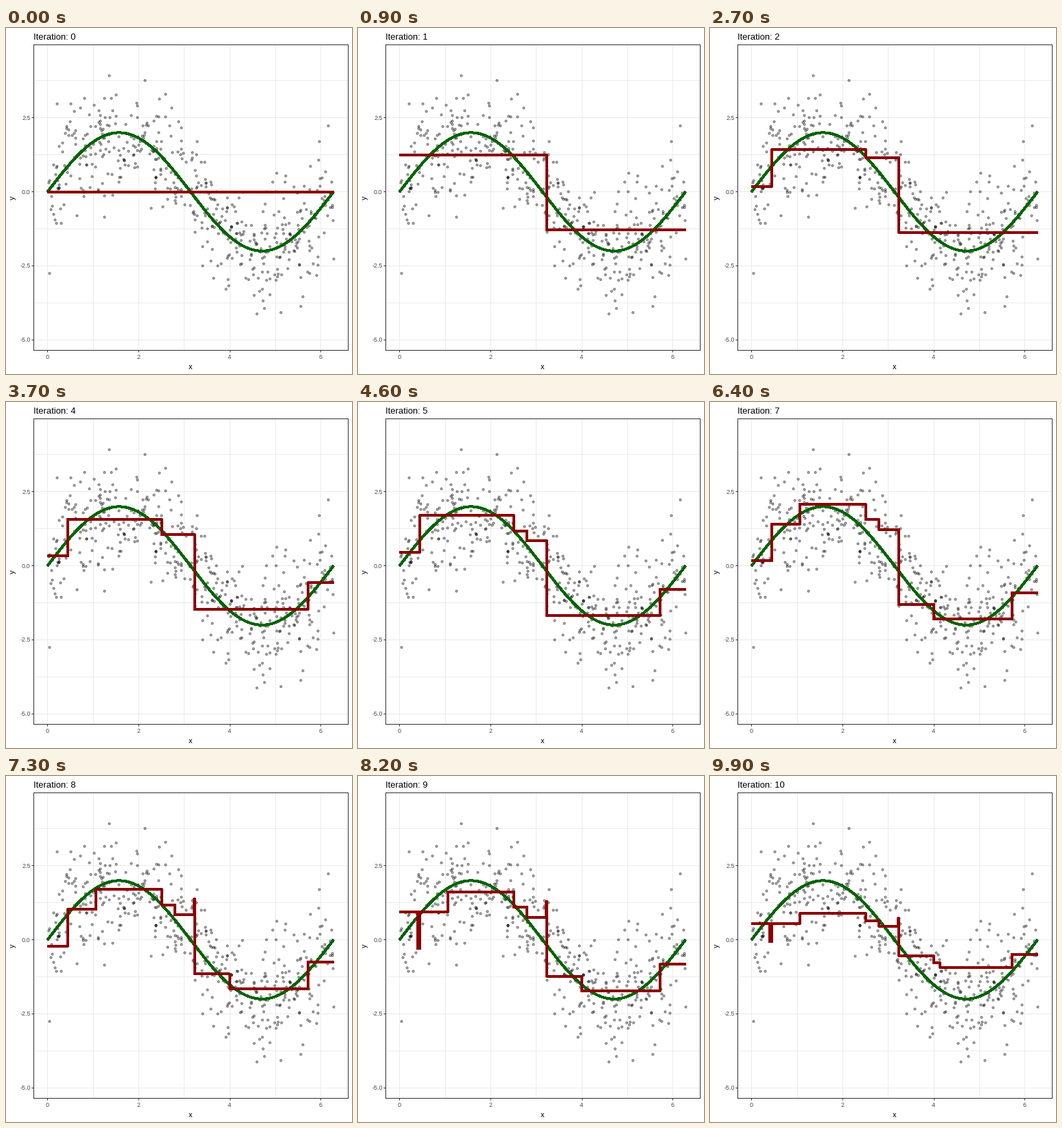
These frames come from a looping animation (504 px wide and 504 px high, 10 s). A matplotlib script:

```python
import matplotlib.pyplot as plt
import numpy as np
from matplotlib.animation import FuncAnimation
from matplotlib.transforms import ScaledTranslation

SIZE, DPI = 504, 72
LEFT, TOP, RIGHT, BOTTOM = 39.6, 23.6, 497.9, 468.7
END = 2 * np.pi
FRAMES, INTERVAL = 100, 100

# Boosted stumps: split, value left of it, value right of it
STUMPS = [
    (3.235, 1.24, -1.29),
    (0.447, -1.21, 0.03),
    (2.51, 0.30, -0.215),
    (5.72, 0.0, 0.90),
    (2.80, 0.13, -0.215),
    (1.065, -0.51, 0.16),
    (4.00, 0.22, -0.275),
    (3.225, -0.38, 0.155),
    (0.402, 1.155, -0.08),
    (4.147, 0.165, -0.165),
]
# Frames halfway between two iterations
TWEENS = [8, *range(18, FRAMES, 9)]

plt.rcParams["font.family"] = "Liberation Sans"


def signal(x):
    return 2 * np.sin(x)


def sample(n=500):
    rng = np.random.default_rng(7)
    x = rng.uniform(0, END, n)
    return x, signal(x) + rng.normal(0, 1, n)


edges = np.array([0, *sorted(s for s, _, _ in STUMPS), END])
mids = (edges[:-1] + edges[1:]) / 2


def prediction(k):
    total = np.zeros_like(mids)
    for split, lo, hi in STUMPS[:k]:
        total += np.where(mids < split, lo, hi)
    return total


fits = [prediction(k) for k in range(len(STUMPS) + 1)]

fig = plt.figure(figsize=(SIZE / DPI, SIZE / DPI), dpi=DPI, facecolor="white")
ax = fig.add_axes([LEFT / SIZE, 1 - BOTTOM / SIZE,
                   (RIGHT - LEFT) / SIZE, (BOTTOM - TOP) / SIZE])
ax.set_xlim(-0.05 * END, 1.05 * END)
ax.set_ylim(-5.35, 4.977)


def label(x, y, text, size, **kw):
    return fig.text(x / SIZE, 1 - y / SIZE, text, fontsize=size, **kw)


# Grid, border and axes
grid = dict(color="#EBEBEB", lw=1, snap=True, zorder=0)
for x in range(7):
    ax.axvline(x, **grid)
for y in np.arange(-5, 4, 1.25):
    ax.axhline(y, **grid)
for spine in ax.spines.values():
    spine.set(color="#333333", linewidth=1)
ax.set_xticks([0, 2, 4, 6])
ax.set_yticks([-5, -2.5, 0, 2.5], ["-5.0", "-2.5", "0.0", "2.5"])
ax.tick_params(length=3, width=1, color="#333333",
               labelcolor="#4D4D4D", labelsize=9)
ax.tick_params(axis="x", pad=3)
ax.tick_params(axis="y", pad=1)
label(269, 497, "x", 11, ha="center", va="baseline")
label(15, 247, "y", 11, ha="right", va="center", rotation=90)
title = label(40, 17, "", 13, va="baseline")

# Data, true curve and fitted steps
ax.plot(*sample(), "o", ms=3, mew=1, mfc=(0, 0, 0, 0.2),
        mec=(0, 0, 0, 0.55), zorder=2)
# Curves run through pixel centres; hard edges add a pixel to the width
half_down = ScaledTranslation(0, -0.5 / DPI, fig.dpi_scale_trans)
curve = dict(lw=3, antialiased=False, snap=False, solid_capstyle="butt",
             solid_joinstyle="round", transform=ax.transData + half_down)
xs = np.linspace(0, END, 500)
ax.plot(xs, signal(xs), color="darkgreen", zorder=3, **curve)
steps, = ax.plot([], [], color="darkred", zorder=4, **curve)


def update(frame):
    k = int(np.searchsorted(TWEENS, frame))
    level = fits[k]
    if frame in TWEENS:
        level = (level + fits[(k + 1) % len(fits)]) / 2
    steps.set_data(np.repeat(edges, 2)[1:-1], np.repeat(level, 2))
    title.set_text(f"Iteration: {k}")
    return steps, title


anim = FuncAnimation(fig, update, frames=FRAMES, interval=INTERVAL,
                     repeat=True, repeat_delay=0)
plt.show()
```
